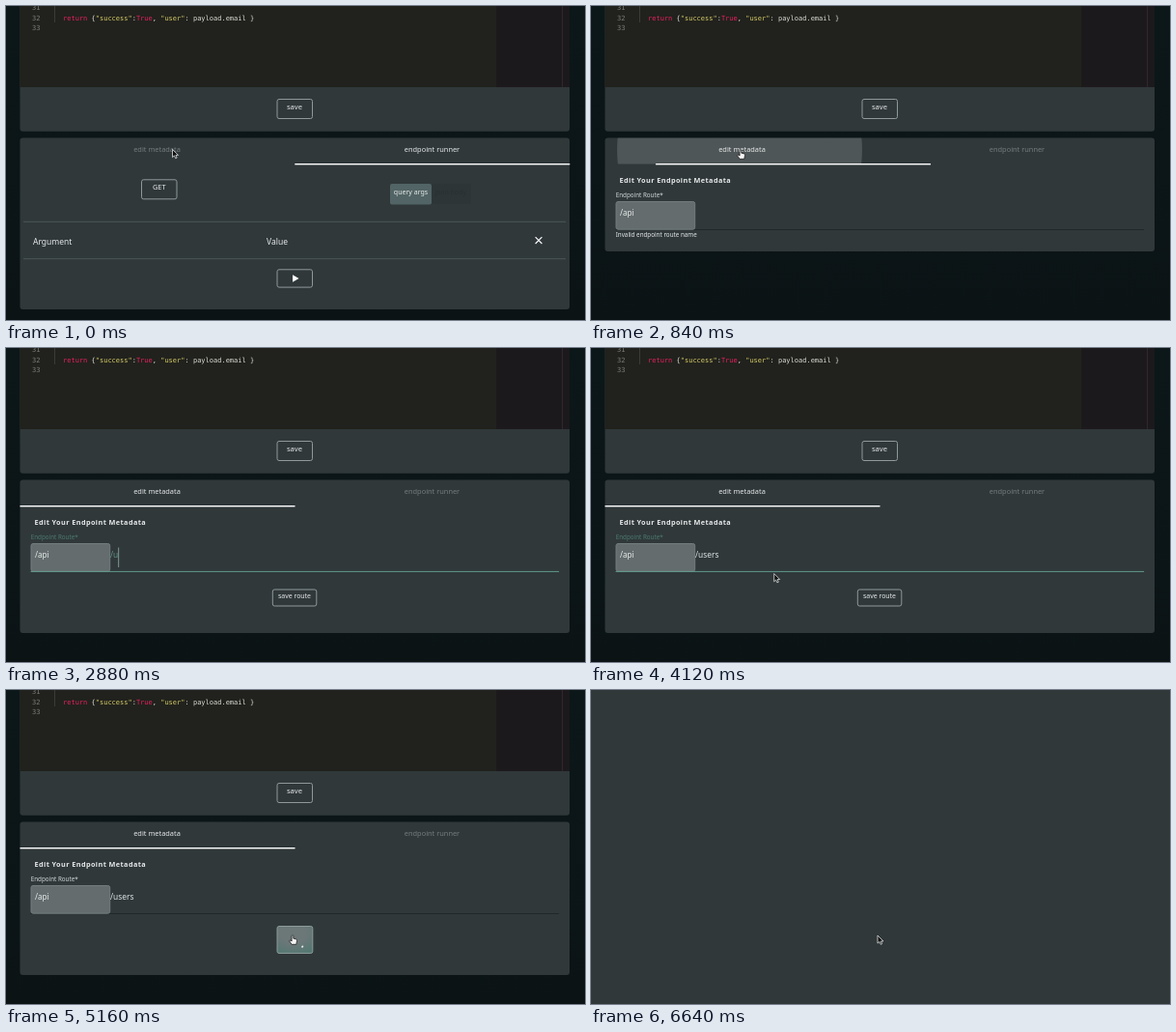
Recreate the animation shown at these times as an HTML page. Size 600 px wide and 325 px high, loop 7 s.

```html
<!DOCTYPE html>
<html lang="en">
<head>
<meta charset="utf-8">
<title>Endpoint editor</title>
<style>
  html, body { margin: 0; width: 100%; height: 100%; overflow: hidden; background: #0c1517; }
  svg { display: block; width: 600px; height: 325px; }
  text { font: 7.4px "Noto Sans", sans-serif; fill: #e6e9e9; white-space: pre; }
  .mid { text-anchor: middle; }
  .code text { font: 7px "DejaVu Sans Mono", monospace; fill: #dcdcd5; }
  .code .num { fill: #7d7e77; }
  .key { fill: #e8205f; }
  .str { fill: #d6cb68; }
  .panel { fill: #30383a; }
  .btn { fill: none; stroke: #8f989a; }
  .rule { stroke: #4c5557; }
  .head { font-size: 8.5px; }
  .small { font-size: 6.28px; }
  .title { font-size: 7.3px; font-weight: 700; letter-spacing: .4px; }
</style>
</head>
<body>
<svg viewBox="0 0 600 325">
  <defs>
    <linearGradient id="page" x2="0" y2="1">
      <stop offset="0" stop-color="#0c1719"/><stop offset="1" stop-color="#0b1315"/>
    </linearGradient>
    <radialGradient id="busyFill" cx=".45" cy=".25" r=".85">
      <stop offset=".45" stop-color="#6c7778"/><stop offset="1" stop-color="#527872"/>
    </radialGradient>
    <clipPath id="tabClip"><rect x="14.5" y="136.5" width="285" height="27"/></clipPath>
  </defs>

  <rect width="600" height="325" fill="url(#page)"/>

  <g class="code">
    <rect class="panel" x="14.5" y="-10" width="569.5" height="139.7" rx="3"/>
    <path fill="#21221d" d="M14.5 0H508V84H14.5Z"/>
    <path fill="#1c191c" d="M508 0H584V84H508Z"/>
    <path stroke="#30272d" d="M576.5 0V84"/>
    <path stroke="#3b3c35" d="M50.5 0V17"/>
    <text class="num" x="27" y="4.2">31</text>
    <text class="num" x="27" y="14.8">32</text>
    <text class="num" x="27" y="25">33</text>
    <text x="59" y="14.8"><tspan class="key">return</tspan> {<tspan class="str">"success"</tspan>:<tspan class="key">True</tspan>, <tspan class="str">"user"</tspan>: payload.email }</text>
  </g>
  <rect class="btn" x="281" y="96.5" width="36.5" height="20" rx="2"/>
  <text class="mid" x="299" y="106.5" style="font-size:7.6px">save</text>

  <rect class="panel" id="panel" x="14.5" y="136.5" width="569.5" rx="3"/>
  <g clip-path="url(#tabClip)"><circle id="tabRipple" cx="154" cy="149" fill="#fff"/></g>
  <text class="mid" id="tabEdit" x="156.5" y="150.5">edit metadata</text>
  <text class="mid" id="tabRun" x="441.5" y="150.5">endpoint runner</text>
  <rect id="ink" y="163" width="285" height="1.4" fill="#fff"/>

  <g id="runner">
    <rect class="btn" x="140.5" y="179.8" width="36.5" height="20" rx="2"/>
    <text class="mid" x="158.8" y="189.8">GET</text>
    <rect x="441" y="184" width="41" height="21" rx="2" fill="#2d3537"/>
    <text class="mid" x="461" y="194.8" style="font-size:7px;fill:#293032">json body</text>
    <rect x="398" y="184" width="43" height="21.5" rx="2" fill="#526465"/>
    <text class="mid" x="419.5" y="194.8" style="font-size:7px">query args</text>
    <path class="rule" d="M18 223.3H580M18 261.7H580"/>
    <text class="head" x="28" y="246.9">Argument</text>
    <text class="head" x="270" y="246.9">Value</text>
    <path stroke="#fff" stroke-width="1.1" d="M548.6 239.2l6.8 6.8m0-6.8l-6.8 6.8"/>
    <rect class="btn" x="281" y="272.8" width="36.5" height="18.3" rx="2"/>
    <path fill="#fff" d="M297 278.2L303.5 282 297 285.8Z"/>
  </g>

  <g id="meta">
    <text class="title" x="29.5" y="182.8">Edit Your Endpoint Metadata</text>
    <text class="small" id="label" x="25.7" y="198.3">Endpoint Route*</text>
    <path stroke="#20282a" d="M25.5 231.5H573"/>
    <rect x="26" y="202.5" width="81.7" height="28.7" rx="2" fill="#646c6d" stroke="#747d7e"/>
    <rect id="focusLine" y="230.9" height="1" fill="#629b8d"/>
    <text x="30" y="217.4" style="font-size:8.1px">/api</text>
    <text id="route" x="108" y="217.4" style="font-size:8.35px"></text>
    <path id="caret" stroke="#87a19b" stroke-width=".9" d="M0 206.5V227"/>
    <text class="small" id="hint" x="25.7" y="239.4">Invalid endpoint route name</text>
    <g id="saveRoute">
      <rect class="btn" id="saveBox" x="276.3" y="250" width="45.5" height="17" rx="2"/>
      <text class="mid" x="299" y="259.3" style="font-size:6.95px">save route</text>
    </g>
    <g id="busy">
      <rect x="281" y="244.5" width="36.8" height="28" rx="2" fill="url(#busyFill)" stroke="#8b9999"/>
      <circle id="spinner" cx="299.5" cy="258.5" r="10.5" fill="none" stroke="#e6eceb" stroke-width="1.7"
        pathLength="100" stroke-linecap="round"/>
    </g>
  </g>

  <rect id="blank" width="600" height="325" fill="#30383a"/>

  <g id="cursor" stroke-linejoin="round">
    <path id="arrow" fill="#111" stroke="#dfe2e2" stroke-width=".8"
      d="M0 0V8.2L1.9 6.5 3.2 9.3 4.6 8.7 3.4 6H6Z"/>
    <path id="hand" fill="#f5f5f5" stroke="#111" stroke-width=".7"
      d="M-.9 .3Q0-.7 .8 .3V3.2L3.6 3.9Q4.6 4.2 4.5 5.4L3.8 9.3H-.9L-3.4 5.8Q-3.2 4.6-2 5.2L-.9 6Z"/>
    <g id="beam" fill="none">
      <path stroke="#e4e7e7" stroke-width="2.6" d="M-2-.3Q0-.3 0 1.2Q0-.3 2-.3M0 1V9M-2 9.8Q0 9.8 0 8.5Q0 9.8 2 9.8"/>
      <path stroke="#111" stroke-width="1" d="M-2-.3Q0-.3 0 1.2Q0-.3 2-.3M0 1V9M-2 9.8Q0 9.8 0 8.5Q0 9.8 2 9.8"/>
    </g>
  </g>
</svg>

<script>
const LOOP = 7000;
const OPEN = 600, FOCUS = 1480, TYPE = 2560, VALID = 2880, BLUR = 4680, BUSY = 4800, SAVED = 6040, BLANK = 6640;
const $ = id => document.getElementById(id);
const show = (id, on) => { $(id).style.display = on ? "" : "none"; };
const set = (id, attrs) => { for (const k in attrs) $(id).setAttribute(k, attrs[k]); };
const ramp = (t, from, to) => Math.min(1, Math.max(0, (t - from) / (to - from)));
const mix = (a, b, p) => a + (b - a) * p;
const blend = (a, b, p) => `rgb(${a.map((v, i) => Math.round(mix(v, b[i], p)))})`;
const smooth = p => p * p * (3 - 2 * p);

function bezier(x1, y1, x2, y2) {
  const at = (a, b, s) => 3 * (1 - s) ** 2 * s * a + 3 * (1 - s) * s * s * b + s ** 3;
  return x => {
    let lo = 0, hi = 1;
    for (let i = 0; i < 24; i++) {
      const s = (lo + hi) / 2;
      if (at(x1, x2, s) < x) lo = s; else hi = s;
    }
    return at(y1, y2, lo);
  };
}
const slide = bezier(.35, 0, .25, 1);
const spread = bezier(0, 0, .2, 1);

const keys = [[2560, "/"], [2880, "/u"], [3000, "/us"], [3160, "/use"], [3240, "/user"], [3400, "/users"]];
const path = [[0, 172.5, 148.4], [40, 172.5, 148.4], [320, 155, 149], [920, 155, 149], [1340, 149, 218],
  [3900, 149, 218], [4120, 189.5, 233.5], [4580, 297, 254], [LOOP, 297, 254]];

function drawCursor(t) {
  const i = path.findIndex(p => p[0] > t);
  const [t0, x0, y0] = path[i - 1], [t1, x1, y1] = path[i];
  const p = ramp(t, t0, t1), e = t0 < 3900 ? smooth(p) : p;
  const x = mix(x0, x1, e), y = mix(y0, y1, e);
  const onTab = t > 160 && y < 163;
  const onButton = x > 276 && t < SAVED;
  const onInput = t > 1000 && x > 108 && y > 203 && y < 230;
  const shape = onTab || onButton ? "hand" : onInput ? "beam" : "arrow";
  for (const s of ["arrow", "hand", "beam"]) show(s, s === shape);
  show("cursor", t < TYPE || t >= 3920);
  set("cursor", { transform: `translate(${x} ${y})` });
}

function drawTabs(t) {
  const editing = t >= OPEN;
  set("ink", { x: mix(299.3, 14.5, slide(ramp(t, 567, 1067))) });
  $("tabEdit").style.fill = editing ? "#e6e9e9" : "#747c7e";
  $("tabRun").style.fill = editing ? "#747c7e" : "#e6e9e9";
  set("tabRipple", {
    r: 147 * spread(ramp(t, OPEN, OPEN + 450)),
    opacity: .15 * ramp(t, OPEN, OPEN + 120) * (1 - ramp(t, 900, 1280))
  });
  show("runner", !editing);
  show("meta", editing);
}

function drawField(t) {
  const typed = keys.filter(k => k[0] <= t);
  const last = typed.length ? typed[typed.length - 1] : [FOCUS, ""];
  const route = $("route");
  if (route.textContent !== last[1]) route.textContent = last[1];
  route.style.fill = t < 3000 ? "#5f9185" : "#dfe4e4";
  const focused = t >= FOCUS && t < BLUR;
  const blinkOn = t - last[0] < 520 || (t >= 4420 && t < BLUR);
  show("caret", focused && blinkOn);
  set("caret", { transform: `translate(${108 + (last[1] ? route.getComputedTextLength() + .4 : 0)} 0)` });

  const tint = ramp(t, FOCUS, FOCUS + 240) * (1 - ramp(t, BLUR, BLUR + 300));
  $("label").style.fill = blend([210, 215, 215], [76, 122, 111], tint);
  const half = 273.8 * slide(ramp(t, FOCUS, FOCUS + 240));
  set("focusLine", { x: 299.3 - half, width: 2 * half, opacity: 1 - ramp(t, BLUR, BLUR + 300) });
}

function drawForm(t) {
  const invalid = t < VALID, button = t >= TYPE && t < SAVED;
  const bottom = t < OPEN ? 314 : 248 + (invalid ? 6 : 0) + (button ? 47 : 0);
  set("panel", { height: bottom - 136.5 });
  show("hint", invalid);
  show("saveRoute", button && t < BUSY);
  set("saveRoute", { transform: `translate(0 ${invalid ? 6 : 0})` });
  $("saveBox").style.fill = `rgba(255,255,255,${.08 * ramp(t, 4490, 4600) + .15 * ramp(t, BLUR, BUSY)})`;
  show("busy", button && t >= BUSY);
  const turn = (t - 5160) * .27 + 41;
  const arc = 1 + 24 * Math.sin((t - 5160) * Math.PI / 1333) ** 2;
  set("spinner", { transform: `rotate(${turn} 299.5 258.5)`, "stroke-dasharray": `${arc} 100` });
}

function frame(now) {
  const t = now % LOOP;
  drawTabs(t);
  drawField(t);
  drawForm(t);
  show("blank", t >= BLANK);
  drawCursor(t);
}

const start = performance.now();
function tick() {
  frame(performance.now() - start);
  requestAnimationFrame(tick);
}
tick();
</script>
</body>
</html>
```
